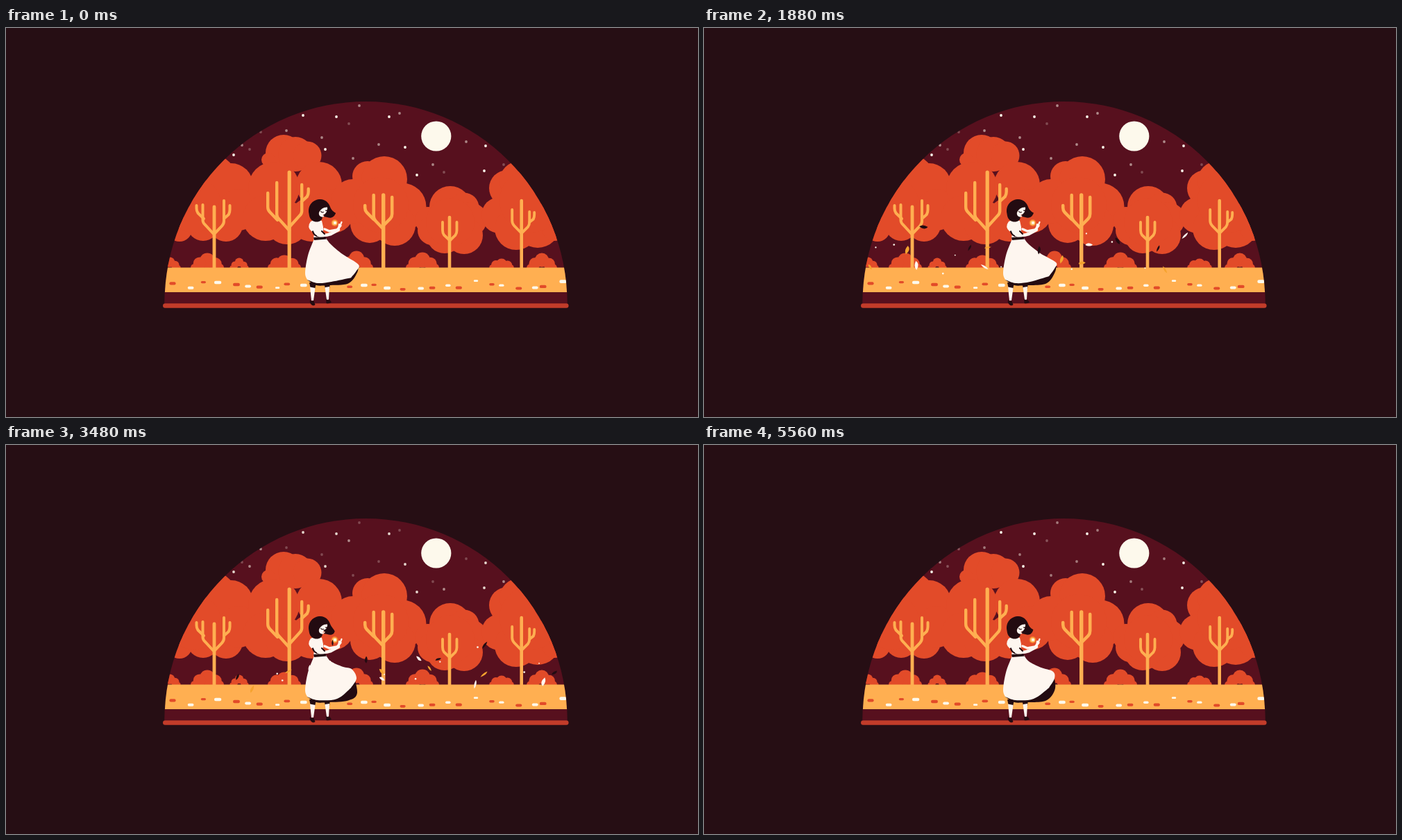
An HTML page with a canvas that plays this animation: 997x561 px, repeating every 5600 ms.

```html
<!DOCTYPE html>
<html lang="en">
<head>
<meta charset="utf-8">
<title>Autumn dome</title>
<style>
html, body { margin: 0; width: 100%; height: 100%; overflow: hidden; background: #260e14; }
canvas { display: block; }
</style>
</head>
<body>
<canvas id="stage" width="997" height="561"></canvas>
<script>
const ctx = document.getElementById('stage').getContext('2d');
const LOOP = 5600, STEP = 40, GUST = 960, TURN = 2 * Math.PI;
const HORIZON = 345.5, GROUND_END = 381;
const C = { night: '#260e14', sky: '#57101e', red: '#e24b29', amber: '#ffaf51',
  base: '#c23c2a', cream: '#fdf9ec', dress: '#fef6ef', dark: '#230b11', gold: '#f5a32f' };

// ---- helpers ----
// Repeatable random numbers from 0 to 1.
function seeded(seed) {
  return () => (seed = (seed * 16807) % 2147483647) / 2147483647;
}

function disc(x, y, r, color) {
  ctx.fillStyle = color;
  ctx.beginPath();
  ctx.arc(x, y, r, 0, TURN);
  ctx.fill();
}

function pill(x, y, w, h, color) {
  ctx.fillStyle = color;
  ctx.beginPath();
  ctx.roundRect(x - w / 2, y - h / 2, w, h, h / 2);
  ctx.fill();
}

function shape(d, color) {
  ctx.fillStyle = color;
  ctx.fill(new Path2D(d));
}

function line(d, width, color) {
  ctx.strokeStyle = color;
  ctx.lineWidth = width;
  ctx.lineCap = ctx.lineJoin = 'round';
  ctx.stroke(new Path2D(d));
}

// Smooth curve through points, joined to the current path.
function spline(pts) {
  ctx.lineTo(...pts[0]);
  for (let i = 0; i < pts.length - 1; i++) {
    const a = pts[i - 1] || pts[i], b = pts[i], c = pts[i + 1], d = pts[i + 2] || c;
    ctx.bezierCurveTo(b[0] + (c[0] - a[0]) / 6, b[1] + (c[1] - a[1]) / 6,
      c[0] - (d[0] - b[0]) / 6, c[1] - (d[1] - b[1]) / 6, c[0], c[1]);
  }
}

function domeClip(from, to) {
  ctx.beginPath();
  ctx.arc(518.5, 396, 290, from, to);
  ctx.clip();
}

// ---- sky ----
// Three groups of stars, each brightest at its own moment.
const stars = [
  { peak: 0, at: [[428, 126], [476, 128], [552, 128], [460, 175], [575, 172],
    [328, 183], [592, 212], [689, 206], [691, 170]] },
  { peak: 1100, at: [[494, 138], [367, 150], [351, 175], [631, 208], [717, 197]] },
  { peak: 533, at: [[509, 112], [567, 123], [404, 148], [455, 158], [340, 169],
    [500, 188], [537, 168], [615, 197], [663, 164]] }
];

function drawSky(t) {
  ctx.fillStyle = C.sky;
  ctx.fillRect(220, 100, 600, 300);
  for (const { peak, at } of stars) {
    ctx.globalAlpha = 0.6 + 0.4 * Math.cos((t - peak) * 3 / LOOP * TURN);
    at.forEach(([x, y]) => disc(x, y, 1.9, C.cream));
  }
  ctx.globalAlpha = 1;
  disc(619.8, 156, 21.6, C.cream);
}

// ---- trees and ground ----
const crowns = [
  [294, 222, 40], [324, 227, 32], [250, 290, 18], [284, 284, 23], [317, 284, 24],
  [270, 255, 40], [335, 262, 30],
  [400, 180, 26], [417, 182, 25], [434, 184, 20.5], [378, 190, 10], [386, 230, 37],
  [451, 226, 33], [374, 274, 33], [405, 281, 31], [440, 276, 32], [470, 264, 32],
  [521, 214, 22], [545, 218, 33], [571, 258, 34.5], [560, 284, 30], [524, 282, 28],
  [500, 250, 32], [540, 255, 40],
  [640, 258, 30], [660, 259, 21.5], [608, 277, 19], [668, 276, 25], [660, 299, 27],
  [632, 299, 26], [614, 292, 21], [640, 280, 35],
  [722, 231, 26], [740, 221, 29], [711, 270, 26], [735, 289, 31], [766, 285, 32],
  [790, 289, 18], [757, 249, 46]
];
// Branches: offset from the trunk, top, height of the joint, offset of the joint.
const trees = [
  { x: 300, top: 258, w: 4.8, branches: [[-16.5, 255, 298, 0], [-25.5, 256, 275, -15], [14, 249, 297, 0], [22.5, 256, 275, 14]] },
  { x: 408.2, top: 208, w: 5.2, branches: [[-18, 223, 292, 0], [-31, 238, 277, -17], [18, 226, 287, 0], [27.5, 232, 250, 18]] },
  { x: 543.7, top: 241, w: 5.4, branches: [[-14, 241, 290, 0], [-26.5, 256, 276, -14], [12.5, 244, 285, 0]] },
  { x: 639, top: 273, w: 4.6, branches: [[-10, 280, 306, 0], [10.5, 280, 307, 0]] },
  { x: 742.7, top: 249, w: 4.6, branches: [[-13.5, 262, 296, 0], [11.5, 265, 296, 0], [18.5, 266, 280, 11.5]] }
];
// Bushes: centre, width, height.
const bushes = [[236, 30, 15], [290, 46, 21], [336, 26, 14], [401, 46, 18],
  [505, 46, 24], [600, 46, 22], [714, 34, 13], [772, 42, 21]];

function drawTree({ x, top, w, branches }) {
  line(`M${x} ${top}V${HORIZON + 3}`, w, C.amber);
  for (const [dx, y, joint, to] of branches) {
    const run = to - dx, bend = joint - Math.abs(run) * 1.05;
    line(`M${x + dx} ${y}V${bend - 4}Q${x + dx} ${bend} ${x + dx + run * .2} ${bend + 3}L${x + to} ${joint}`,
      w * .84, C.amber);
  }
}

function drawBush([x, w, h]) {
  disc(x, HORIZON - h + w * .24, w * .24, C.red);
  disc(x - w * .24, HORIZON - h * .28, w * .2, C.red);
  disc(x + w * .25, HORIZON - h * .25, w * .2, C.red);
  disc(x - w * .4, HORIZON, w * .12, C.red);
  disc(x + w * .4, HORIZON, w * .12, C.red);
}

function drawStones() {
  const rnd = seeded(71);
  for (let i = 0; i < 28; i++) {
    const x = 240 + i * 20.5 + rnd() * 10, y = 364 + rnd() * 13, w = 6 + rnd() * 5;
    pill(x, y, w, w * .45, i % 2 ? C.cream : C.red);
  }
}

function drawLand() {
  crowns.forEach(c => disc(...c, C.red));
  bushes.forEach(drawBush);
  trees.forEach(drawTree);
  ctx.fillStyle = C.amber;
  ctx.fillRect(220, HORIZON, 600, GROUND_END - HORIZON);
  drawStones();
  ctx.fillStyle = C.sky;
  ctx.fillRect(220, GROUND_END, 600, 20);
}

// ---- girl ----
// One gust runs along the skirt: each point follows the same wave with its own lag.
function drawSkirt(t) {
  const wave = (mean, amp, lag) => mean + amp * Math.cos(t / GUST * TURN - lag * Math.PI / 180);
  const edge = [485, wave(324, 4.5, 60)];
  const tip = [wave(503, 5, 20), wave(335, 12, 60)];
  const fold = [505, wave(347, 12, 75)];
  const corner = [497, wave(358, 9, 75)];
  const hem = [wave(472, 5, 230), 366];
  const lining = [[506, wave(358, 8, 130)], [493, 368.5]];

  ctx.fillStyle = C.dark;
  ctx.beginPath();
  spline([tip, ...lining, [464, 371], [447, 371], [434, 363]]);
  ctx.fill();

  ctx.fillStyle = C.dress;
  ctx.beginPath();
  spline([[461, 303], [468, 312], edge, tip, fold, corner]);
  spline([corner, hem, [449, 368], [434, 363]]);
  spline([[434, 363], [431, 353], [435, 328], [444, 304]]);
  ctx.fill();
}

function drawLegs() {
  shape('M437 367H447L445 377H439Z M458 367H467L466 376H460Z', C.dark);
  shape('M438 373.500L445.500 375L443 393H440Z M459.500 374L466 373L465 391.500L462 392Z', C.dress);
  shape('M438 392Q441 396 443 393L445.500 399Q443 401.500 440 399Q437 396 438 392Z', C.dark);
  shape('M461 390.500Q464 394 466 391.500L469 395.500Q466 398 461.500 397Z', C.dark);
}

function drawTorso() {
  line('M459 290L466 293L477 291L482 285', 3.4, C.dress);
  shape('M446 276L455 278L457 287L457 299L462 304H443L444 296L440 288Z', C.dress);
  shape('M443 302L444 306L462 304.500L460 301Z', C.dark);
  shape('M439 279Q448 274 454 281Q458 288 455 293Q447 296 440 293Q433 287 439 279Z', C.dress);
  line('M442 293.500Q444 300 450 300.500', 2.2, C.dark);
  line('M450 298.500Q460 300 468 297L479 291', 4.6, C.dress);
  line('M479 291L483.500 280M479 290L480 283', 2.2, C.dress);
  line('M455 293L459 297', 2, C.dark);
  disc(473.5, 281, 5, '#f47a2c');
  disc(473.5, 281, 3.6, '#ffc163');
  disc(474, 281, 2, C.cream);
}

function drawHead(t) {
  const sway = Math.sin(t / GUST * TURN) * .7;
  const veil = Math.max(0, Math.sin((t - 2700) / 1900 * Math.PI)) * (t > 2700 && t < 4600);
  const x = 475 - veil + sway, y = 267 + veil * 2 + sway;
  shape(`M436.500 268C434 255 443 247 453 247C460 247 465 252 467 258C469 263 472 265 ${x} ${y}`
    + `C473 273 468 275 463 273C460 272 458 272 456 272C456 278 450 281 444 279C439 277 437 273 436.500 268Z`, C.dark);
  shape('M451 266C453 261 458 258 463 258.500C465 262 463 268 457 272.500C453 273 450 270 451 266Z', C.dress);
  line('M453.500 264.500Q455 266.500 457.500 265.500M460.500 263Q462 264 463 262.500', 1.1, C.dark);
  line('M457 270L459 269', 1, C.red);
  shape(`M463 257Q464 266 457 ${270 - veil * 3}Q464 276 ${x} ${y}Q468 264 463 257Z`, C.dark);
}

// ---- drifting leaves ----
// Born at the left rim one after another, carried to the right on a wavy path.
const leafColors = [C.dress, C.gold, C.dark];
const rnd = seeded(20);
const drifters = Array.from({ length: 42 }, (_, i) => ({
  born: i * 72 + rnd() * 60,
  speed: .23 + rnd() * .03,
  y: 298 + rnd() * 48,
  swing: 8 + rnd() * 14,
  phase: rnd() * TURN,
  spin: (rnd() - .5) * .008,
  size: .7 + rnd() * .3,
  color: leafColors[i % 3],
  speck: i % 5 > 2
}));
const leaf = new Path2D('M-6.500 0Q-2 -5.500 6.500 0.500Q1 4.500 -6.500 0Z');

function drawLeaf(p, t) {
  const age = t - p.born;
  if (age < 0) return;
  const x = 225 + age * p.speed, y = p.y + p.swing * Math.sin(age / 330 + p.phase);
  if (p.speck) return disc(x, y, p.size * 1.4, C.cream);
  ctx.save();
  ctx.translate(x, y);
  ctx.rotate(p.phase + age * p.spin);
  ctx.scale(p.size, p.size * (.85 + .25 * Math.sin(age / 170)));
  ctx.fillStyle = p.color;
  ctx.fill(leaf);
  ctx.restore();
}

// ---- frame ----
function draw(t) {
  ctx.fillStyle = C.night;
  ctx.fillRect(0, 0, 997, 561);
  ctx.save();
  domeClip(0, TURN);
  drawSky(t);
  drawLand();
  ctx.restore();
  ctx.fillStyle = C.night;
  ctx.fillRect(220, 400, 600, 20);
  pill(518.3, 400.5, 584.5, 6.6, C.base);

  drawLegs();
  drawSkirt(t);
  drawTorso();
  drawHead(t);

  ctx.save();
  domeClip(Math.PI, TURN);
  drifters.forEach(p => drawLeaf(p, t));
  ctx.restore();
}

const start = performance.now();
function tick() {
  const t = (performance.now() - start) % LOOP;
  draw(Math.floor(t / STEP) * STEP);
  requestAnimationFrame(tick);
}
tick();
</script>
</body>
</html>
```
